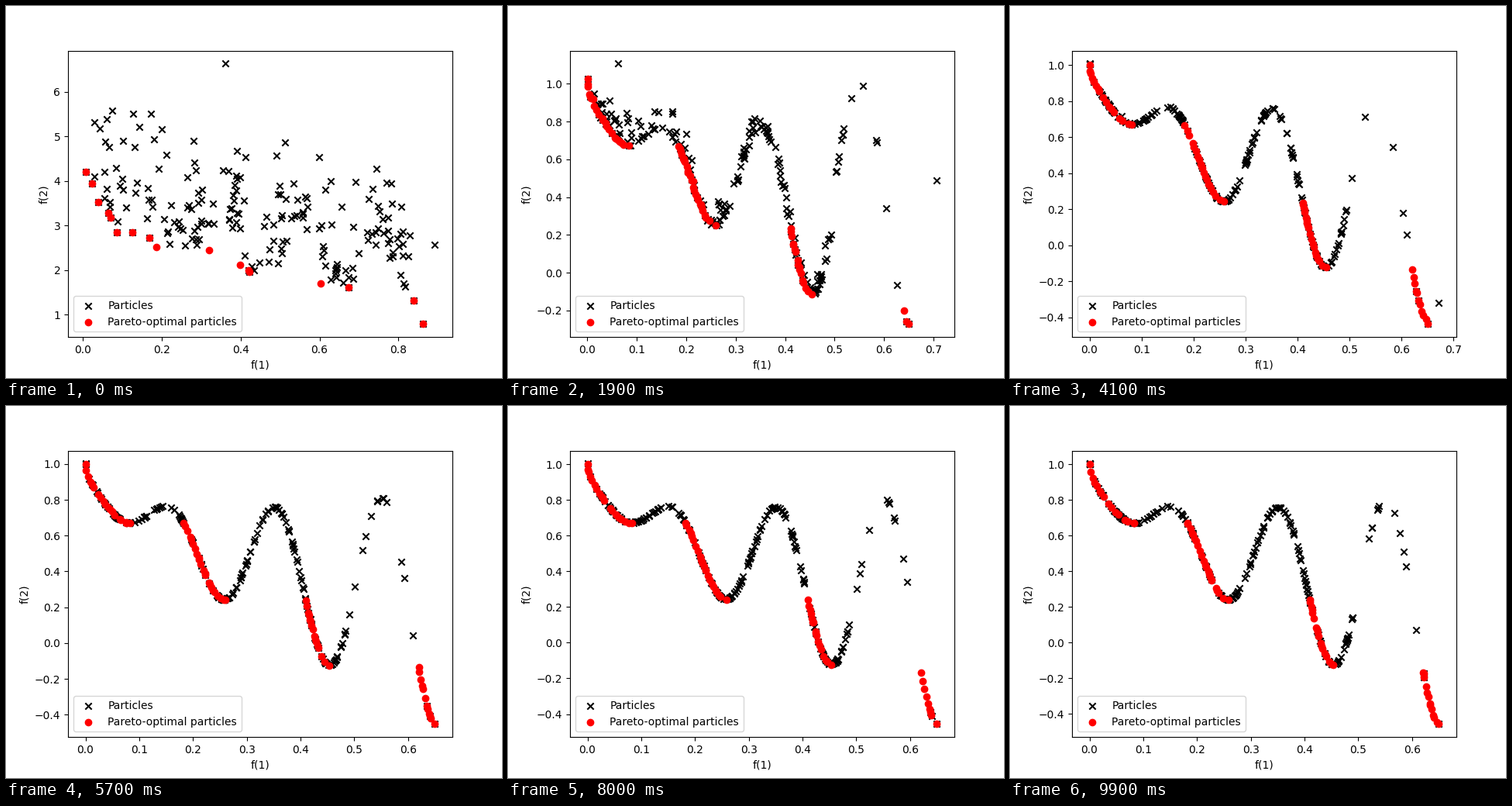
These frames come from a looping animation (640 px wide and 480 px high, 10000 ms). A matplotlib script:

```python
import numpy as np
import matplotlib.pyplot as plt
from matplotlib.animation import FuncAnimation

STEPS, SWARM, CAP = 100, 200, 70
rng = np.random.default_rng(4)


def height(x, g=1.0):
    """Second objective; g = 1 is the limit curve."""
    return g - np.sqrt(x * g) - x * np.sin(10 * np.pi * x)


def solve_g(x, y):
    c = y + x * np.sin(10 * np.pi * x)
    return ((np.sqrt(x) + np.sqrt(x + 4 * c)) / 2) ** 2


def front(points):
    """Points not dominated by any other, from left to right."""
    p = points[np.lexsort((points[:, 1], points[:, 0]))]
    best = np.minimum.accumulate(p[:, 1])
    return p[np.r_[True, p[1:, 1] < best[:-1]]]


def prune(p):
    """Drop crowded points at random, keeping both ends."""
    while len(p) > CAP:
        gap = np.hypot(*(np.diff(p, axis=0) / (.65, 1.5)).T)
        score = (gap[:-1] + gap[1:]) * rng.uniform(.05, 1, len(p) - 2)
        p = np.delete(p, 1 + score.argmin(), axis=0)
    return p


# Starting swarm: extremes first, then a random cloud
edge = np.array([(.36, 6.63), (.006, 4.21), (.862, .79), (.893, 2.57)])
rest = SWARM - len(edge)
x0 = np.r_[edge[:, 0], .02 + .82 * rng.random(rest) ** 1.15]
g0 = np.r_[solve_g(*edge.T),
           np.minimum(3.3 + rng.gamma(2.5, .5, rest), 6.5)]

# Each particle sways around a home while its excess g - 1 dies away
home = np.interp(np.linspace(0, 1, SWARM),
                 [0, .2, .28, 1], [0, .1, .18, .495])
home = rng.permutation(home)
reach = rng.uniform(0, .06, SWARM)
speed = rng.uniform(.2, 1.2, SWARM)
phase = rng.uniform(0, 2 * np.pi, SWARM)
tau = rng.uniform(2.5, 6, SWARM)
home[0], reach[0], tau[0] = .062, 0, 7      # the worst starter lags behind


def explorers(k):
    """Positions of the particles thrown past the main group."""
    if k < 8:
        return np.array([])
    x = rng.uniform(.5, .61, rng.integers(5, 16))
    if k >= 16:
        x = np.r_[x, rng.uniform(.62, .65, 2), .65]
    if k < 45:
        x = np.r_[x, .645 + .127 * np.exp(-k / 26.4)]
    return x


def swarm(k):
    goal = np.maximum(home + reach * np.sin(speed * k + phase), 0)
    goal = .495 - np.abs(.495 - goal)
    x = goal + (x0 - goal) * max(0, 1 - k / 20) ** 3
    g = 1 + (g0 - 1) * np.exp(-k / tau)
    if k:
        g += .003 * np.abs(rng.normal(size=SWARM))
    far = explorers(k)
    if len(far):
        x[-len(far):] = far
        g[-len(far):] = 1 + 2.1 * np.exp(-k / 9.7)
    return np.column_stack([x, height(x, g)])


def simulate():
    x = rng.uniform(.02, .83, 5)
    archive = np.column_stack([x, height(x, rng.uniform(3.1, 3.3, 5))])
    history = []
    for k in range(STEPS):
        p = swarm(k)
        archive = prune(front(np.vstack([archive, p])))
        history.append((p, archive))
    return history


history = simulate()

fig, ax = plt.subplots(figsize=(6.4, 4.8), dpi=100)
crosses = ax.scatter([], [], c="black", marker="x", label="Particles")
dots = ax.scatter([], [], c="red", marker="o",
                  label="Pareto-optimal particles")
ax.set_xlabel("f(1)")
ax.set_ylabel("f(2)")
ax.legend(loc="lower left")


def update(k):
    p, best = history[k]
    crosses.set_offsets(p)
    dots.set_offsets(best)
    both = np.vstack([p, best])
    lo, hi = both.min(axis=0), both.max(axis=0)
    pad = .05 * (hi - lo)
    ax.set_xlim(lo[0] - pad[0], hi[0] + pad[0])
    ax.set_ylim(lo[1] - pad[1], hi[1] + pad[1])
    return crosses, dots


anim = FuncAnimation(fig, update, frames=STEPS, interval=100, repeat=True,
                     repeat_delay=0, blit=False)
plt.show()
```
